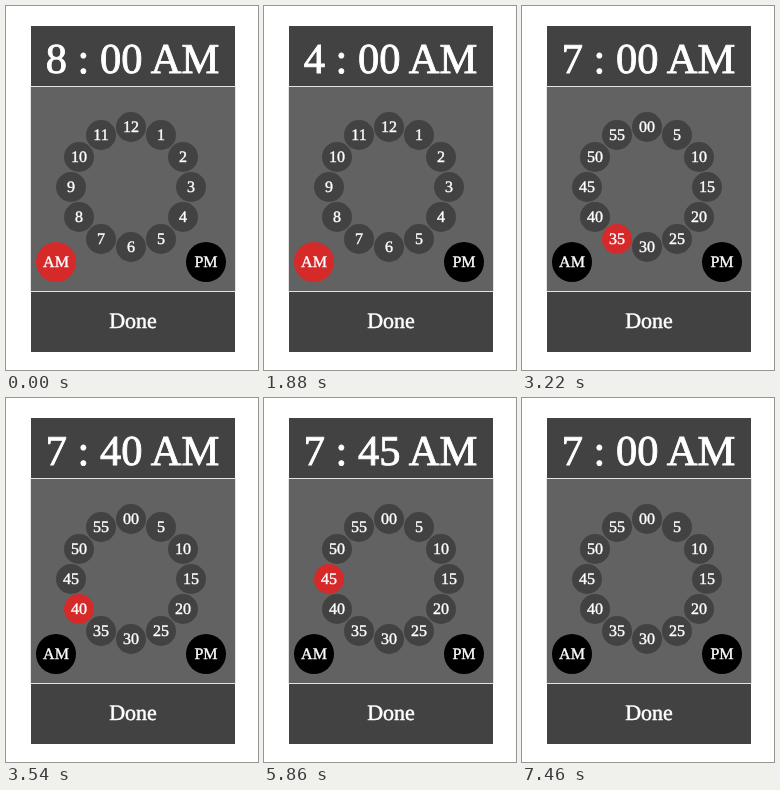
Recreate the animation shown at these times as an HTML page. Size 252 px wide and 364 px high, loop 8100 ms.

```html
<!DOCTYPE html>
<html lang="en">
<head>
<meta charset="utf-8">
<title>Time picker</title>
<style>
  html, body { margin: 0; width: 100%; height: 100%; overflow: hidden; background: #fff; }
  svg { display: block; }
  text {
    font-family: "Liberation Serif", Times, serif; font-size: 16px; text-anchor: middle;
    text-rendering: geometricPrecision; fill: #fff; stroke: #fff; stroke-width: .4;
  }
  .bar, .dial circle { fill: #424242; }
  .face { fill: #626262; stroke: #e4e4e4; }
  .period circle { fill: #000; }
  .on circle { fill: #d62a2a; }
  #time { font-size: 42.5px; stroke-width: .9; }
  #done { font-size: 22px; stroke-width: .5; }
</style>
</head>
<body>
<svg id="stage" width="252" height="364">
  <rect class="bar" x="25" y="20" width="204" height="326"/>
  <rect class="face" x="24.5" y="80.5" width="205" height="205"/>
  <text id="time" x="126.5" y="67"></text>
  <text id="done" x="127" y="322">Done</text>
</svg>
<script>
const LOOP = 8100;
const MINUTES_AT = 3220;
const NONE = -1;

// [start in ms, hovered dial position]
const hovers = [
  [0, NONE], [1180, 1], [1300, 2], [1440, 3], [1580, 4],
  [1880, NONE], [1980, 5], [2100, 6], [2400, 7],
  [3480, NONE], [3540, 8], [3860, NONE], [3940, 9], [4160, 10], [5860, 9],
  [7320, NONE], [7390, 0], [7460, NONE]
];

const stage = document.getElementById('stage');
const timeText = document.getElementById('time');

function add(parent, tag, attrs) {
  const el = document.createElementNS('http://www.w3.org/2000/svg', tag);
  for (const key in attrs) el.setAttribute(key, attrs[key]);
  return parent.appendChild(el);
}

function button(kind, x, y, r, label = '') {
  const group = add(stage, 'g', { class: kind });
  add(group, 'circle', { cx: x, cy: y, r });
  const text = add(group, 'text', { x, y: y + 5 });
  text.textContent = label;
  return { group, text };
}

const dial = Array.from({ length: 12 }, (_, i) => {
  const angle = i * Math.PI / 6;
  return button('dial', Math.round(125 + 60 * Math.sin(angle)), Math.round(181 - 60 * Math.cos(angle)), 15);
});
const am = button('period', 50, 256, 20, 'AM');
button('period', 200, 256, 20, 'PM');

const pad = n => String(n).padStart(2, '0');

function render(t) {
  const picksMinutes = t >= MINUTES_AT;
  let hour = 8, minute = 0, hovered = NONE;
  for (const [start, position] of hovers) {
    if (start > t) break;
    hovered = position;
    if (position === NONE) continue;
    if (start < MINUTES_AT) hour = position;
    else minute = position * 5;
  }
  timeText.textContent = `${hour} : ${pad(minute)} AM`;
  dial.forEach(({ group, text }, i) => {
    text.textContent = picksMinutes ? (i ? i * 5 : '00') : i || 12;
    group.classList.toggle('on', i === hovered);
  });
  am.group.classList.toggle('on', !picksMinutes);
}

const began = performance.now();
function tick() {
  render((performance.now() - began) % LOOP);
  requestAnimationFrame(tick);
}
tick();
</script>
</body>
</html>
```
